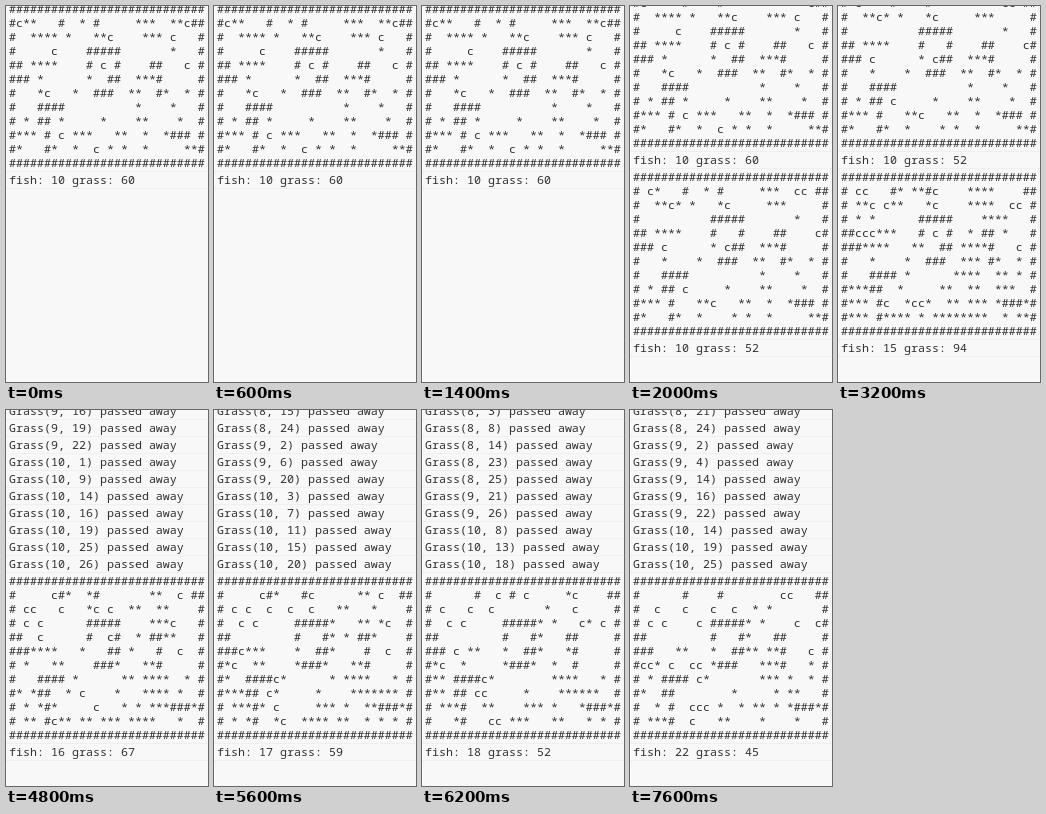
These frames come from a looping animation (202x376 px, 8 s). An HTML page:

```html
<!DOCTYPE html>
<html lang="en">
<head>
<meta charset="utf-8">
<style>
html, body { margin: 0; width: 100%; height: 100%; overflow: hidden; background: #f8f8f8; }
#log { position: absolute; left: 0; right: 0; font: 11.667px/14px "Noto Sans Mono", monospace; color: #303030; }
#log div { padding: 1px 0 1px 3px; border-bottom: 1px solid #ebf0f3; white-space: pre; }
</style>
</head>
<body>
<div id="log"></div>
<script>
// Each turn: fish, grass, withered grass cells, map rows inside the outer wall
const turns = [
  [10, 60, '', `
#c**   #  * #     ***  **c##
#  **** *   **c    *** c   #
#     c    #####       *   #
## ****    # c #    ##   c #
### *      *  ##  ***#     #
#   *c   *  ###  **  #*  * #
#   ####          *    *   #
# * ## *     *    **    *  #
#*** # c ***   **  *  *### #
#*   #*  *  c * *  *     **#
`],
  [10, 52, '', `
# c*   #  * #     ***  cc ##
#  **c* *   *c     ***     #
#          #####       *   #
## ****    #   #    ##    c#
### c      * c##  ***#     #
#   *    *  ###  **  #*  * #
#   ####          *    *   #
# * ## c     *    **    *  #
#*** #   **c   **  *  *### #
#*   #*  *    * *  *     **#
`],
  [15, 94, '', `
# cc   #* **#c    ****    ##
# **c c**   *c    ****  cc #
# * *      #####    ****   #
##ccc***   # c #  * ## *   #
###****   **  ## ****#   c #
#   *    *  ###  *** #*  * #
#   #### *      ****  ** * #
#***##  *     **  **  ***  #
#*** #c  *cc*  ** *** *###*#
#*** #**** * ********  * **#
`],
  [16, 67, '9,16 9,19 9,22 10,1 10,9 10,14 10,16 10,19 10,25 10,26', `
#     c#*  *#       **  c ##
# cc   c   *c c  **  **    #
# c c      #####    ***c   #
##  c      #  c#  * ##**   #
###****   *   ## *   #  c  #
# *   **    ###*   **#     #
#   #### *      ** ****  * #
#* *##  * c    *   **** *  #
# * *#*     c   * * ***###*#
# ** #c** ** *** ****   *  #
`],
  [17, 59, '8,15 8,24 9,2 9,6 9,20 10,3 10,7 10,11 10,15 10,20', `
#     c#*   #c      ** c  ##
# c c  c  c  c   **   *    #
#  c c     #####*   ** *c  #
##         #   #* * ##*    #
###c***    *  ##*    #  c  #
#*c  **    *###*   **#     #
#*  ####c*      * ****   * #
#***## c*     *    ******* #
# ***#* c     *** *  **###*#
# * *#  *c  **** **  * * * #
`],
  [18, 52, '8,3 8,8 8,14 8,23 8,25 9,21 9,26 10,8 10,13 10,18', `
#      #  c # c     *c    ##
# c   c  c       *   c     #
#  c c     #####* *   c* c #
##         #   #*   ##     #
### c **   *  ##*   *#     #
#*c  *     *###*  *  #     #
#** ####c*        ****   * #
#** ## cc     *    ******  #
# ***#  **    *** *   *###*#
#   *#   cc ***   **   * * #
`],
  [22, 45, '8,21 8,24 9,2 9,4 9,14 9,16 9,22 10,14 10,19 10,25', `
#      #    #        cc   ##
#  c   c   c  c  * *       #
# c c    c #####* *    c  c#
##         #   #*   ##     #
###   **   *  ##** **#   c #
#cc* c  cc *###   ***#   * #
# * #### c*       *** *  * #
#*  ##        *     * **   #
#  * #  ccc *  * ** * *###*#
# ***#  c   **    *    *   #
`]
];

const wall = '#'.repeat(28);
const message = text => `<div>${text}</div>`;
const turnHtml = ([fish, grass, dead, map]) => [
  ...dead.split(' ').filter(Boolean).map(cell => `Grass(${cell.replace(',', ', ')}) passed away`),
  wall + map + wall,
  `fish: ${fish} grass: ${grass}`
].map(message).join('');

const log = document.getElementById('log');
let shown = -1;

function draw() {
  const second = Math.floor(performance.now() % 8000 / 1000);
  const turn = Math.max(0, second - 1);
  if (turn !== shown) {
    shown = turn;
    log.innerHTML = turns.slice(0, turn + 1).map(turnHtml).join('');
    log.style.bottom = turn ? '25px' : '193px';
  }
  requestAnimationFrame(draw);
}
draw();
</script>
</body>
</html>
```
